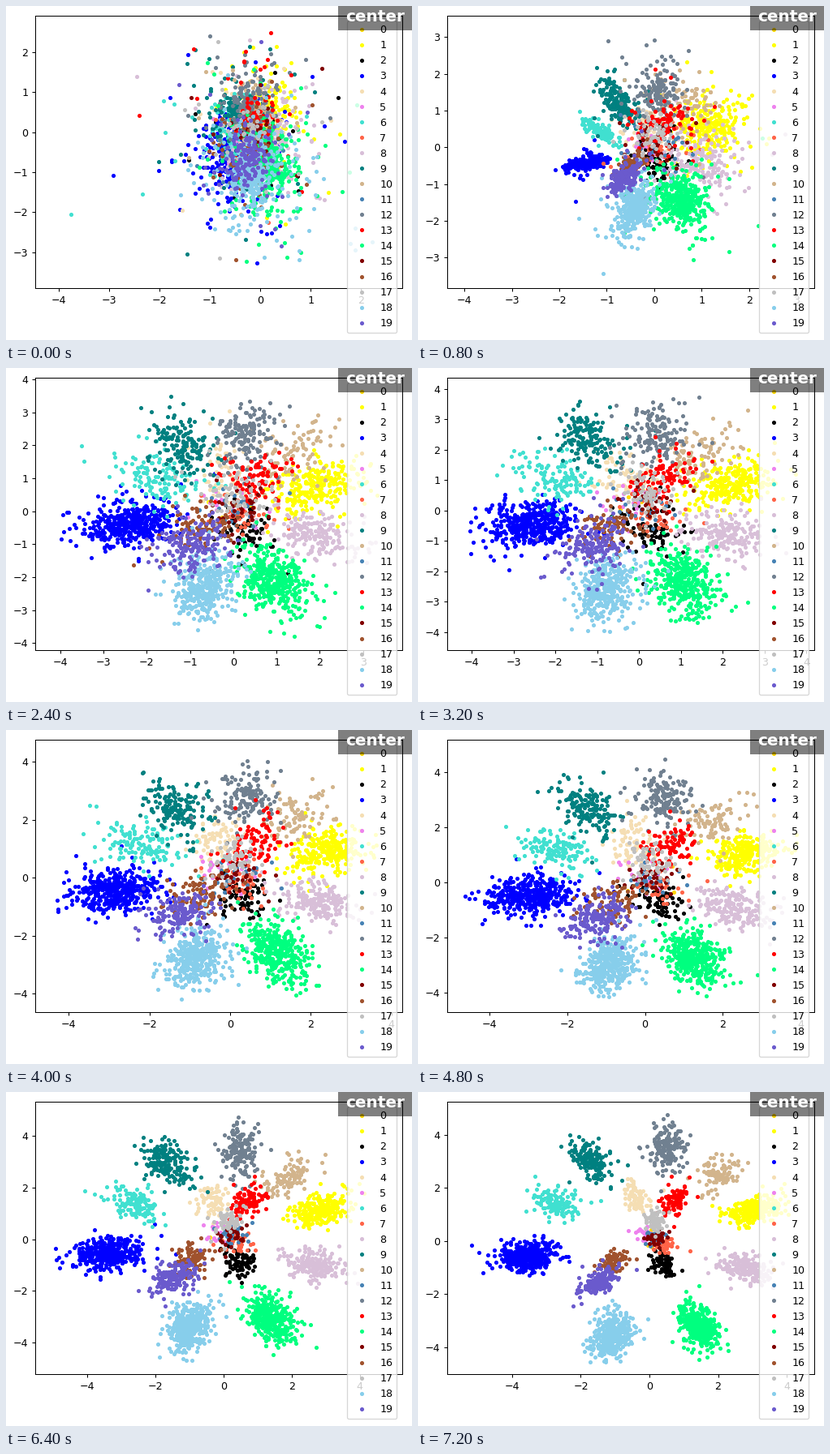
A matplotlib script that plays this animation: 500 by 412 pixels, repeating every 8 s.

```python
import numpy as np
import matplotlib.pyplot as plt
from matplotlib.animation import FuncAnimation
from matplotlib.patches import Rectangle

W, H, DPI = 500, 412, 100
LEFT, RIGHT, TOP, BOTTOM = 36.4, 487.6, 12, 348
STEPS = 10
SHRINK = 1 / 1.1  # default styling, slightly reduced

for key, size in {
    "font.size": 10, "axes.linewidth": 0.8, "patch.linewidth": 1,
    "lines.markersize": 6, "lines.markeredgewidth": 1,
    "xtick.major.size": 3.5, "ytick.major.size": 3.5,
    "xtick.major.width": 0.8, "ytick.major.width": 0.8,
    "xtick.major.pad": 3.5, "ytick.major.pad": 3.5,
}.items():
    plt.rcParams[key] = size * SHRINK
plt.rcParams["font.family"] = "DejaVu Sans"

# Colour, final centre in the plane, number of points
CLASSES = [
    ("gold", 0.2 + 0.1j, 4), ("yellow", 3.05 + 1.2j, 270),
    ("black", 0.42 - 0.9j, 75), ("blue", -3.57 - 0.55j, 430),
    ("wheat", -0.4 + 1.65j, 75), ("violet", -0.17 + 0.3j, 20),
    ("turquoise", -2.75 + 1.45j, 130), ("tomato", 0.42 - 0.1j, 40),
    ("thistle", 2.8 - 1.05j, 190), ("teal", -1.7 + 3.1j, 165),
    ("tan", 2 + 2.6j, 90), ("steelblue", 0.2 + 0.2j, 25),
    ("slategray", 0.52 + 3.55j, 150), ("red", 0.76 + 1.55j, 90),
    ("springgreen", 1.45 - 3.2j, 400), ("maroon", 0.2 + 0.15j, 32),
    ("sienna", -1.05 - 0.8j, 90), ("silver", 0.17 + 0.8j, 60),
    ("skyblue", -1.1 - 3.55j, 370), ("slateblue", -1.5 - 1.55j, 170),
]

# Axis limits at key steps: x from, x to, y from, y to
VIEW_STEPS = [0, 2, 3, 4, 6, 7, 9]
VIEWS = np.array([
    (-4.46, 2.81, -3.89, 2.90), (-4.25, 3.92, -3.78, 4.26),
    (-4.57, 3.90, -4.21, 4.05), (-4.58, 4.18, -4.59, 4.37),
    (-5.07, 4.34, -4.69, 5.16), (-5.17, 5.68, -5.42, 5.39),
    (-5.88, 4.79, -5.01, 5.25)])


def view(step):
    return [np.interp(step, VIEW_STEPS, col) for col in VIEWS.T]


def mixed_cloud(home, z, g):
    """All classes piled on one narrow, long-tailed column."""
    turned = home * np.exp(1j * np.radians(20))
    centre = -0.17 - 0.17j + 0.12 * turned.real + 0.25j * turned.imag
    tail = np.exp(0.6 * g)
    return centre + tail * (0.27 * z[0] + 0.46j * z[1])


def own_cluster(home, z, g, t):
    """A class drifting outwards, stretched along its own radius."""
    r = abs(home)
    tight = t ** 2.5
    along = (0.38 + 0.05 * r) * (1 - tight) + (0.15 + 0.08 * r) * tight
    across = 0.36 * (1 - tight) + (0.12 + 0.04 * r) * tight
    centre = home * (0.58 + 0.42 * t ** 0.85)
    tail = np.exp((0.2 - 0.05 * t) * g)
    return centre + home / r * tail * (along * z[0] + 1j * across * z[1])


def sample(step, cls):
    _, home, n = CLASSES[cls]
    rng = np.random.default_rng(1000 * step + cls)
    z, g = rng.normal(size=(2, n)), rng.normal(size=n)
    unfold = min(1, 0.6 * step)
    t = max(0, (step - 2) / (STEPS - 3))
    pts = ((1 - unfold) * mixed_cloud(home, z, g)
           + unfold * own_cluster(home, z, g, t))

    x1, x2, y1, y2 = view(step)
    inside = ((abs(pts.real - (x1 + x2) / 2) < 0.455 * (x2 - x1))
              & (abs(pts.imag - (y1 + y2) / 2) < 0.455 * (y2 - y1)))
    return pts.real[inside], pts.imag[inside]


fig = plt.figure(figsize=(W / DPI, H / DPI), dpi=DPI, facecolor="white")
ax = fig.add_axes([LEFT / W, 1 - BOTTOM / H,
                   (RIGHT - LEFT) / W, (BOTTOM - TOP) / H])
dots = [ax.plot([], [], ".", color=color, label=str(i))[0]
        for i, (color, _, _) in enumerate(CLASSES)]
ax.legend(loc="upper right", labelspacing=0.478)

# Caption in the corner
fig.add_artist(Rectangle((409 / W, 382 / H), 91 / W, 30 / H, lw=0,
                         transform=fig.transFigure, fc="black", alpha=0.5,
                         zorder=5))
fig.text(418 / W, 393 / H, "center", color="white", weight="bold",
         size=14.4, va="baseline", zorder=6)


def update(step):
    x1, x2, y1, y2 = view(step)
    ax.set(xlim=(x1, x2), ylim=(y1, y2))
    for cls, line in enumerate(dots):
        line.set_data(*sample(step, cls))
    return dots


anim = FuncAnimation(fig, update, frames=STEPS, interval=800,
                     repeat=True, blit=False)
plt.show()
```
